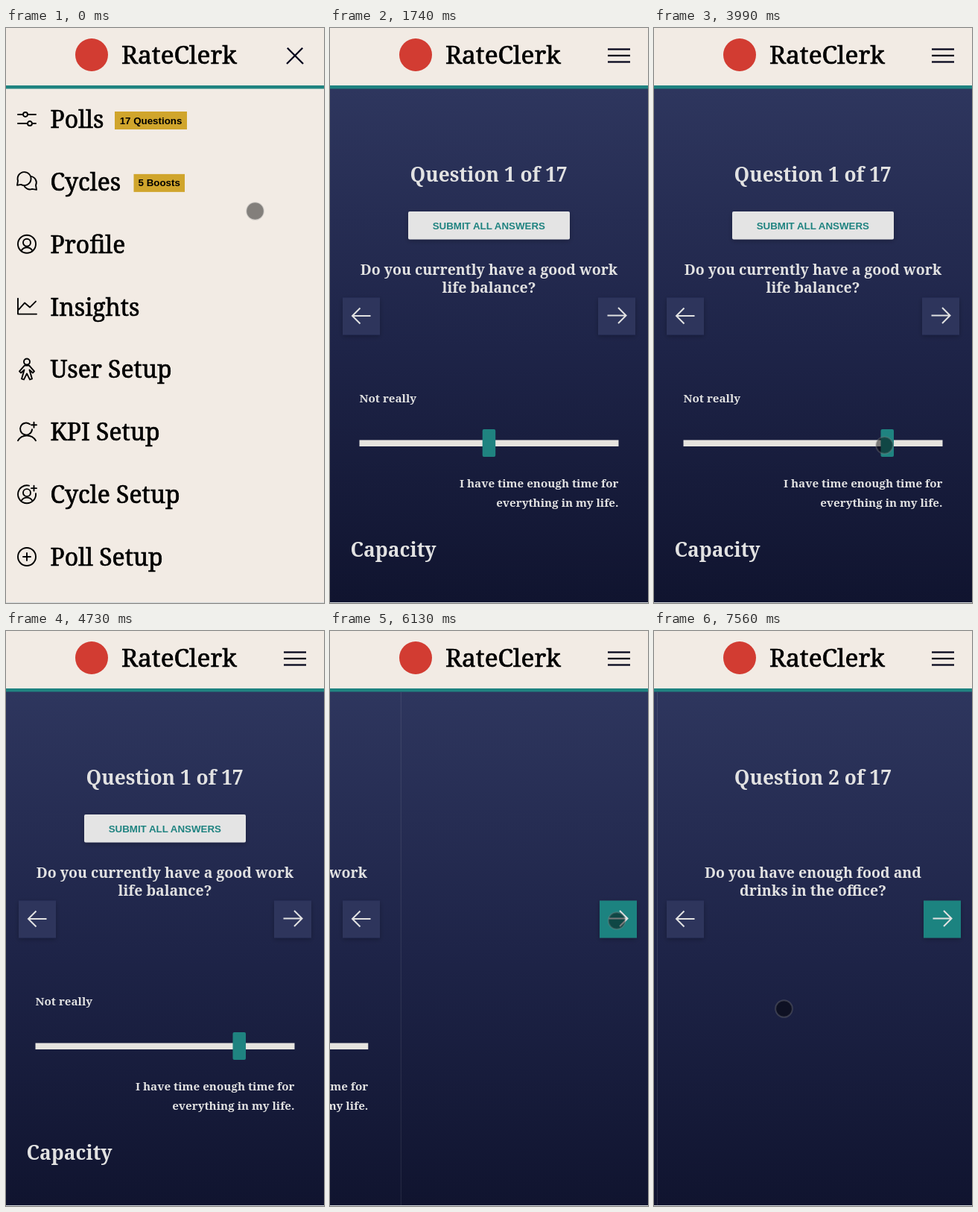
Animation, 427 px wide and 771 px high, one loop 8000 ms. Source, as an HTML page:

```html
<!DOCTYPE html>
<html lang="en">
<head>
<meta charset="utf-8">
<title>Poll app menu</title>
<style>
  html, body { margin: 0; width: 100%; height: 100%; overflow: hidden; background: #f2ebe4; }
  svg { display: block; width: 100vw; height: 100vh; }
  text { font-family: "Noto Serif", "Liberation Serif", serif; }
  .title, .item { stroke: currentColor; stroke-width: .7px; fill: currentColor; }
  .title { font-size: 33.5px; }
  .item { font-size: 31.9px; }
  .tag, .cta { font: bold 13.33px "Liberation Sans", Arial, sans-serif; }
  .page text { fill: #e2e2e2; font-weight: 600; }
  .page text.cta { fill: #1f8380; font-weight: 700; }
  .mid { text-anchor: middle; }
  .end { text-anchor: end; }
  .head { font-size: 26.3px; }
  .ask { font-size: 19.5px; }
  .note { font-size: 15.2px; }
  .icon { fill: none; stroke: currentColor; stroke-width: 1.9; stroke-linecap: round; stroke-linejoin: round; }
  .arrow { fill: none; stroke: #e2e2e2; stroke-width: 2; }
  .edge { stroke: #fff; stroke-opacity: .1; }
  #burger line { stroke: #06061c; stroke-width: 2.3; }
</style>
</head>
<body>
<svg viewBox="0 0 427 771">
  <defs>
    <linearGradient id="night" x1="0" y1="0" x2="0" y2="1">
      <stop offset="0" stop-color="#2e365e"/>
      <stop offset=".5" stop-color="#1e2448"/>
      <stop offset="1" stop-color="#10142f"/>
    </linearGradient>
    <linearGradient id="shade">
      <stop offset="0" stop-color="#00061c" stop-opacity=".6"/>
      <stop offset="1" stop-color="#00061c" stop-opacity="0"/>
    </linearGradient>
    <filter id="soft" x="-30%" y="-30%" width="160%" height="170%">
      <feDropShadow dx="0" dy="2" stdDeviation="3" flood-color="#000" flood-opacity=".25"/>
    </filter>
  </defs>

  <rect y="81" width="427" height="690" fill="url(#night)"/>

  <g id="first" class="page">
    <path class="edge" d="M431.5 82V770"/>
    <path id="caret" d="M108.5 178V215" stroke="#c8c8d0"/>
    <text class="head mid" x="213" y="206">Question 1 of 17</text>
    <g id="submit">
      <rect x="105" y="246" width="217" height="37.5" rx="2" fill="#e4e4e4" filter="url(#soft)"/>
      <text class="cta mid" x="213.3" y="270">SUBMIT ALL ANSWERS</text>
    </g>
    <text class="ask mid" x="213.5" y="331">Do you currently have a good work</text>
    <text class="ask mid" x="213.5" y="355">life balance?</text>
    <text class="note" x="39.5" y="502">Not really</text>
    <rect x="39.5" y="552.5" width="348" height="8.5" fill="#e6e4df"/>
    <rect id="thumb" y="538" width="17.5" height="37" rx="2" fill="#1f8380"/>
    <text class="note end" x="387.5" y="616">I have time enough time for</text>
    <text class="note end" x="387.5" y="642">everything in my life.</text>
    <text id="capacity" class="head" x="27.5" y="709">Capacity</text>
  </g>

  <g id="second" class="page">
    <path class="edge" d="M-3.5 82V770"/>
    <text class="head mid" x="213.3" y="206">Question 2 of 17</text>
    <text class="ask mid" x="213.5" y="331">Do you have enough food and</text>
    <text class="ask mid" x="213.5" y="355">drinks in the office?</text>
  </g>

  <g filter="url(#soft)">
    <rect x="17" y="361.5" width="50" height="50" fill="#2d355c"/>
    <path class="arrow" d="M54.5 386H30M40.5 375.5L30 386L40.5 396.5"/>
  </g>
  <g id="next" filter="url(#soft)">
    <rect id="nextBox" x="360" y="361.5" width="50" height="50"/>
    <path class="arrow" d="M372.5 385.5H397.5M387 375L397.5 385.5L387 396"/>
  </g>

  <g id="menu">
    <rect x="432" y="81" width="40" height="689" fill="url(#shade)"/>
    <rect x="-4" y="81" width="436" height="689" fill="#f2ebe4"/>
    <rect id="glow" x="-4" y="81" width="436" height="85.5" fill="#48b3c8"/>
    <g id="items"></g>
  </g>

  <rect width="427" height="77" fill="#f2ebe4"/>
  <rect y="77" width="427" height="4.5" fill="#1f8380"/>
  <circle cx="115" cy="36" r="22" fill="#d23c32"/>
  <text class="title" x="155" y="48">RateClerk</text>
  <g id="burger"><line/><line/><line/></g>
  <rect y="770" width="427" height="1" fill="#d3d8da"/>
  <circle id="dot" r="11.3" fill="#000" fill-opacity=".46" stroke="#8a8a8a" stroke-opacity=".32" stroke-width="2"/>
</svg>

<script>
const LOOP = 8000;
const $ = id => document.getElementById(id);
const clamp = v => Math.max(0, Math.min(1, v));
const part = (t, from, to) => clamp((t - from) / (to - from));
const mix = (a, b, p) => a + (b - a) * p;
const smooth = p => p * p * (3 - 2 * p);
const blend = (a, b, p) => `rgb(${a.map((v, i) => Math.round(mix(v, b[i], p)))})`;
const move = (el, x, y = 0) => el.setAttribute('transform', `translate(${x} ${y})`);
const fade = (el, v) => el.setAttribute('opacity', v);

// Icon parts, drawn around (0, 0).
const ring = (x, y, r) => `M${x - r} ${y}a${r} ${r} 0 1 0 ${2 * r} 0a${r} ${r} 0 1 0 ${-2 * r} 0`;
const plus = (x, y, r) => `M${x - r} ${y}h${2 * r}M${x} ${y - r}v${2 * r}`;
const knob = (x, y) => `M-12 ${y}H${x - 3}M${x + 3} ${y}H12` + ring(x, y, 3);
const bust = ring(0, -2, 5) + 'M-7.5 9A8.5 8.5 0 0 1 7.5 9';
const openRing = 'M3-11.5A12 12 0 1 0 12-1';

const items = [
  { label: 'Polls', icon: knob(-2, -6) + knob(4, 6), tag: '17 Questions', x: 146, w: 97 },
  { label: 'Cycles', icon: 'M-13 5L-12-1A9 9 0 1 1-8 4ZM5-7A8.5 8.5 0 0 1 12 5L13 11L7 10A8.5 8.5 0 0 1-4 5', tag: '5 Boosts', x: 171.5, w: 68.5 },
  { label: 'Profile', icon: ring(0, 0, 12) + bust },
  { label: 'Insights', icon: 'M-12-11V10H13M-11 4L-3-5L4 1L12-7' },
  { label: 'User Setup', icon: ring(0, -10, 4) + 'M-3-5H3L10 3L8 5L3.5 1L7 13L4 14L0 6L-4 14L-7 13L-3.5 1L-8 5L-10 3Z' },
  { label: 'KPI Setup', icon: 'M4-10A8 8 0 1 0 7-3M-12 12A14 14 0 0 1 12 12' + plus(9.5, -9, 3.5) },
  { label: 'Cycle Setup', icon: openRing + bust + plus(9.5, -8, 3.5) },
  { label: 'Poll Setup', icon: ring(0, 0, 12) + plus(0, 0, 5) }
];

$('items').innerHTML = items.map(({ label, icon, tag, x, w }, i) => {
  const y = 134 + i * 83.86;
  const badge = tag ? `<rect x="${x}" y="${y - 22}" width="${w}" height="24" fill="#d0a52c"/>
    <text class="tag mid" x="${x + w / 2}" y="${y - 5.5}">${tag}</text>` : '';
  return `<g><path class="icon" transform="translate(28 ${y - 12})" d="${icon}"/>
    <text class="item" x="59.5" y="${y}">${label}</text>${badge}</g>`;
}).join('');

const pollRow = $('items').firstElementChild;
const [pollTag, pollTagText] = [...pollRow.children].slice(2);
const bars = [...$('burger').children];

// Pointer strokes: each runs along a curve from one point to the next.
const glides = [
  { go: 100, stop: 890, from: [334.5, 245.5], bend: [220, 85], to: [113.5, 131.5] },
  { go: 2020, stop: 2530, from: [348, 320], bend: [245, 472], to: [210, 536] },
  { go: 2670, stop: 3020, from: [210, 536], bend: [240, 630], to: [323, 571] },
  { go: 3200, stop: 3350, from: [323, 571], bend: [316, 565], to: [309.5, 559.5] },
  { go: 3990, stop: 4310, from: [309.5, 559.5], bend: [325, 475], to: [348, 381] },
  { go: 7110, stop: 7560, from: [385, 388.5], bend: [295, 430], to: [174.5, 506.5] }
];

function drawMenu(t) {
  const p = part(t, 1120, 1740), lit = part(t, 1080, 1200);
  move($('menu'), -431 * p * p);
  fade($('menu'), 1 - p ** 1.28);
  fade($('glow'), lit);
  pollRow.style.color = blend([0, 0, 0], [178, 226, 242], lit);
  pollTag.style.fill = blend([208, 165, 44], [146, 178, 131], lit);
  pollTagText.style.fill = blend([0, 0, 0], [29, 76, 90], lit);
}

// Each bar swings flat about its right end while that end slides into place.
function drawBurger(t) {
  const q = part(t, 1110, 1410);
  bars.forEach((bar, i) => {
    const angle = (i + 1) * Math.PI / 4 * (1 - q);
    const x = mix(399 - 11 * i, 403, 1 - (1 - q) ** 3);
    const y = mix(48, 28.5 + 8.5 * i, q ** 3);
    bar.setAttribute('x1', x);
    bar.setAttribute('y1', y);
    bar.setAttribute('x2', x - 30 * Math.cos(angle));
    bar.setAttribute('y2', y - 30 * Math.sin(angle));
  });
  fade(bars[1], clamp(q * 4));
}

function drawPages(t) {
  const out = part(t, 5430, 6220), back = 1 - part(t, 6260, 7050);
  move($('first'), -427 * out * out);
  move($('second'), 431 * back ** 3);
  fade($('second'), t < 6260 ? 0 : 1);

  const drop = part(t, 5430, 5655), lift = part(t, 5560, 5760);
  move($('submit'), 0, 21 * drop);
  fade($('submit'), 1 - drop);
  move($('capacity'), 0, -8 * lift);
  fade($('capacity'), 1 - lift);
  fade($('caret'), t >= 5560 && t < 5720 ? 1 : 0);

  $('thumb').setAttribute('x', mix(204.7, 304.5, part(t, 3530, 3620)));
  const hover = part(t, 5430, 5560);
  move($('next'), 2 * hover);
  $('nextBox').setAttribute('fill', blend([45, 53, 92], [31, 131, 128], hover));
}

function drawDot(t) {
  const away = (t > 1420 && t < 2020) || (t > 4310 && t < 5430);
  fade($('dot'), away ? 0 : 1);
  const begun = t >= 5430 ? glides.slice(-1) : glides.filter(g => g.go <= t);
  const { go, stop, from, bend, to } = begun.pop() || glides[0];
  const p = smooth(part(t, go, stop));
  const at = k => mix(mix(from[k], bend[k], p), mix(bend[k], to[k], p), p);
  move($('dot'), at(0), at(1));
}

const start = performance.now();
function frame() {
  const t = (performance.now() - start) % LOOP;
  drawMenu(t);
  drawBurger(t);
  drawPages(t);
  drawDot(t);
  requestAnimationFrame(frame);
}
frame();
</script>
</body>
</html>
```
